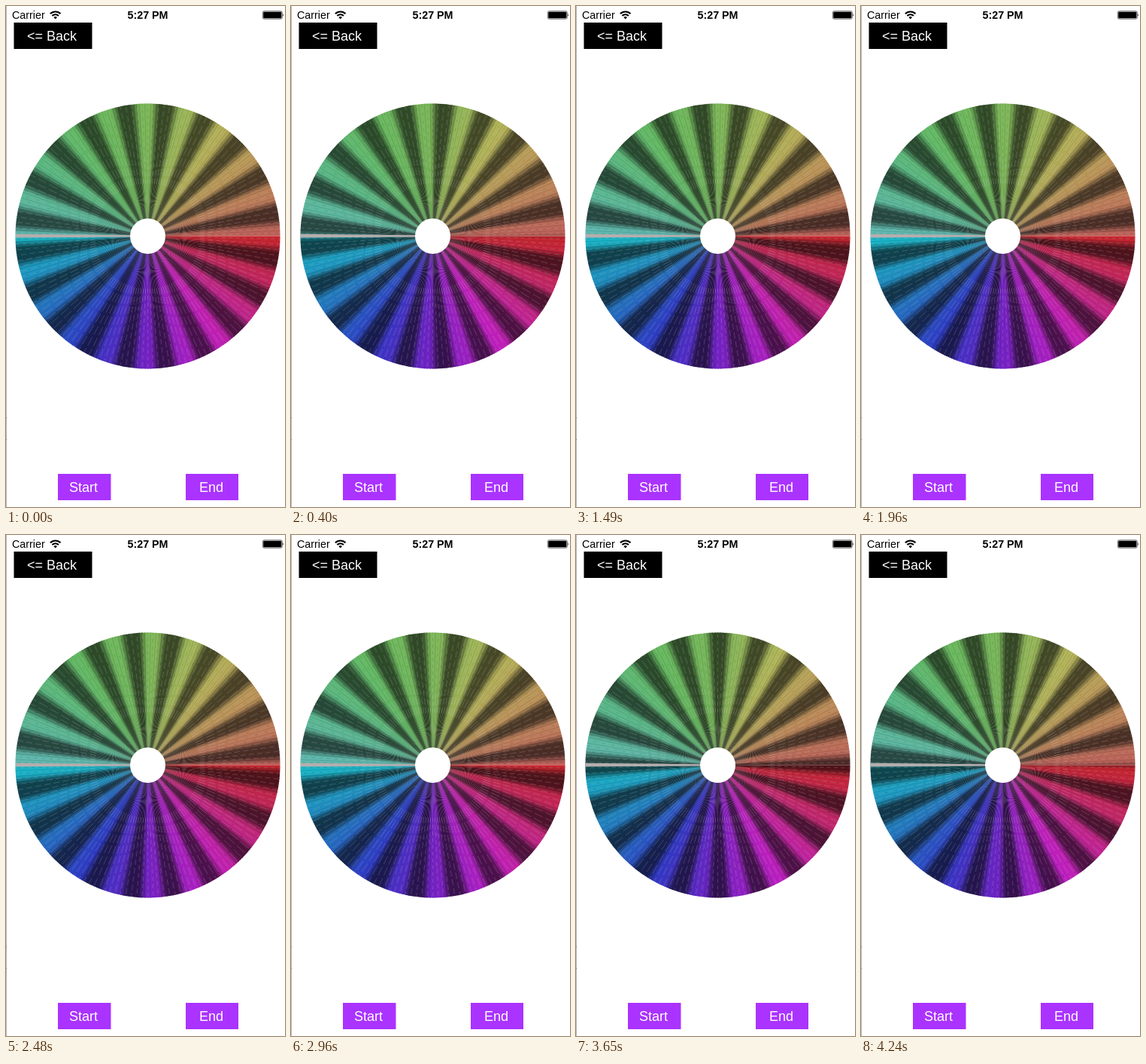
Animation, 371 px wide and 665 px high, one loop 4300 ms. Source, as an HTML page:

```html
<!DOCTYPE html>
<html lang="en">
<head>
<meta charset="utf-8">
<title>Colour wheel</title>
<style>
html, body { margin: 0; width: 100%; height: 100%; overflow: hidden; background: #fff; }
svg { display: block; width: 371px; height: 665px; }
text { font-family: "Liberation Sans", Arial, sans-serif; font-size: 18px; }
.status { font-size: 14.3px; }
.button { fill: #aa33ff; }
.label { fill: #fff; }
</style>
</head>
<body>
<svg viewBox="0 0 371 665">
  <rect width="371" height="665" fill="#fff"/>
  <path d="M.5 0V665" stroke="#b4b4b4"/>
  <path d="M.5 546v1m0 28v1" stroke="#777"/>

  <text class="status" x="8" y="17">Carrier</text>
  <g fill="none" stroke="#000" stroke-width="2">
    <path d="M58.9 10.2a9.6 9.6 0 0 1 13.6 0M61.4 13a6 6 0 0 1 8.6 0"/>
    <path d="M65.7 17.6l-2.3-2.5a3.3 3.3 0 0 1 4.6 0z" fill="#000" stroke="none"/>
  </g>
  <text class="status" x="188.5" y="17" text-anchor="middle" font-weight="bold">5:27 PM</text>
  <rect x="341.3" y="6.8" width="26" height="10.4" rx="2" fill="#fff" stroke="#000" stroke-width=".6"/>
  <rect x="342.2" y="7.7" width="24.2" height="8.6" rx="1.2"/>
  <path d="M368.3 10.2q1.8 1.8 0 3.6z"/>

  <rect x="10.5" y="22" width="104" height="35"/>
  <text class="label" x="28" y="46">&lt;= Back</text>

  <g id="wheel"></g>
  <path d="M13 302.8L166 304.3V306.5L13 307.6z" fill="#b5aeae"/>
  <circle cx="188.5" cy="305.5" r="23.5" fill="#fff"/>

  <rect class="button" x="69" y="621" width="70.5" height="35"/>
  <text class="label" x="84" y="645">Start</text>
  <rect class="button" x="239" y="621" width="70" height="35"/>
  <text class="label" x="257" y="645">End</text>
</svg>
<script>
const LOOP = 4300, STEP = 58, LAST_STEP = 73;
const CX = 188.5, CY = 305.5, INNER = 22, OUTER = 176;
const SLICE = 1.2, HALF = 180 / SLICE;

// Each half has ten bands, which run from its left end to its right end.
const BAND = 18, FIRST_PHASE = -.06, PHASE_PER_STEP = .1205;

// Colours every 30 degrees, from the left end of each half to the right end.
const UPPER = [[95, 185, 178], [90, 185, 135], [102, 187, 97], [125, 185, 90],
  [180, 183, 90], [190, 145, 90], [190, 97, 90]];
const LOWER = [[25, 185, 200], [35, 125, 192], [48, 58, 200], [118, 35, 200],
  [195, 32, 195], [195, 40, 118], [200, 38, 45]];

const mix = (a, b, k) => a + (b - a) * k;
const wheel = document.getElementById('wheel');

function point(angle, radius, side) {
  const a = angle * Math.PI / 180;
  return `${(CX - radius * Math.cos(a)).toFixed(2)} ${(CY + side * radius * Math.sin(a)).toFixed(2)}`;
}

function add(tag, attributes) {
  const node = document.createElementNS('http://www.w3.org/2000/svg', tag);
  for (const name in attributes) node.setAttribute(name, attributes[name]);
  return wheel.appendChild(node);
}

function baseColour(stops, angle) {
  const i = Math.min(5, Math.floor(angle / 30));
  return stops[i].map((c, n) => mix(c, stops[i + 1][n], angle / 30 - i));
}

const slices = [];
for (const [side, stops] of [[-1, UPPER], [1, LOWER]]) {
  for (let i = 0; i < HALF; i++) {
    const from = i * SLICE, to = Math.min(180, from + SLICE + .25);
    const d = `M${point(from, INNER, side)}L${point(from, OUTER, side)}` +
      `L${point(to, OUTER, side)}L${point(to, INNER, side)}z`;
    const angle = from + SLICE / 2;
    slices.push({ node: add('path', { d }), angle, colour: baseColour(stops, angle) });
  }
}

// Fine spokes crowd together and darken the middle; every other one is a pale dash.
for (const side of [-1, 1]) {
  for (let i = 1; i < HALF; i++) {
    const angle = i * SLICE;
    const d = `M${point(angle, INNER, side)}L${point(angle, OUTER, side)}`;
    add('path', { d, stroke: '#000', 'stroke-width': .4, opacity: .3 });
    if (i % 2) {
      const dash = 5 + 9 * Math.abs(Math.sin(angle * Math.PI / 90));
      const d = `M${point(angle, 70, side)}L${point(angle, OUTER, side)}`;
      add('path', { d, stroke: '#fff', 'stroke-width': .6, opacity: .28, 'stroke-dasharray': `${dash} 4` });
    }
  }
}

function draw(time) {
  const step = Math.min(LAST_STEP, Math.floor(time / STEP + .35));
  const phase = FIRST_PHASE + step * PHASE_PER_STEP;
  for (const { node, angle, colour } of slices) {
    const wave = 1.6 * Math.cos(2 * Math.PI * (angle / BAND - phase));
    const light = .69 + .31 * Math.max(-1, Math.min(1, wave));
    node.setAttribute('fill', `rgb(${colour.map(c => Math.round(c * light + 8 * (1 - light))).join()})`);
  }
}

const start = performance.now();
function tick() {
  draw((performance.now() - start) % LOOP);
  requestAnimationFrame(tick);
}
tick();
</script>
</body>
</html>
```
